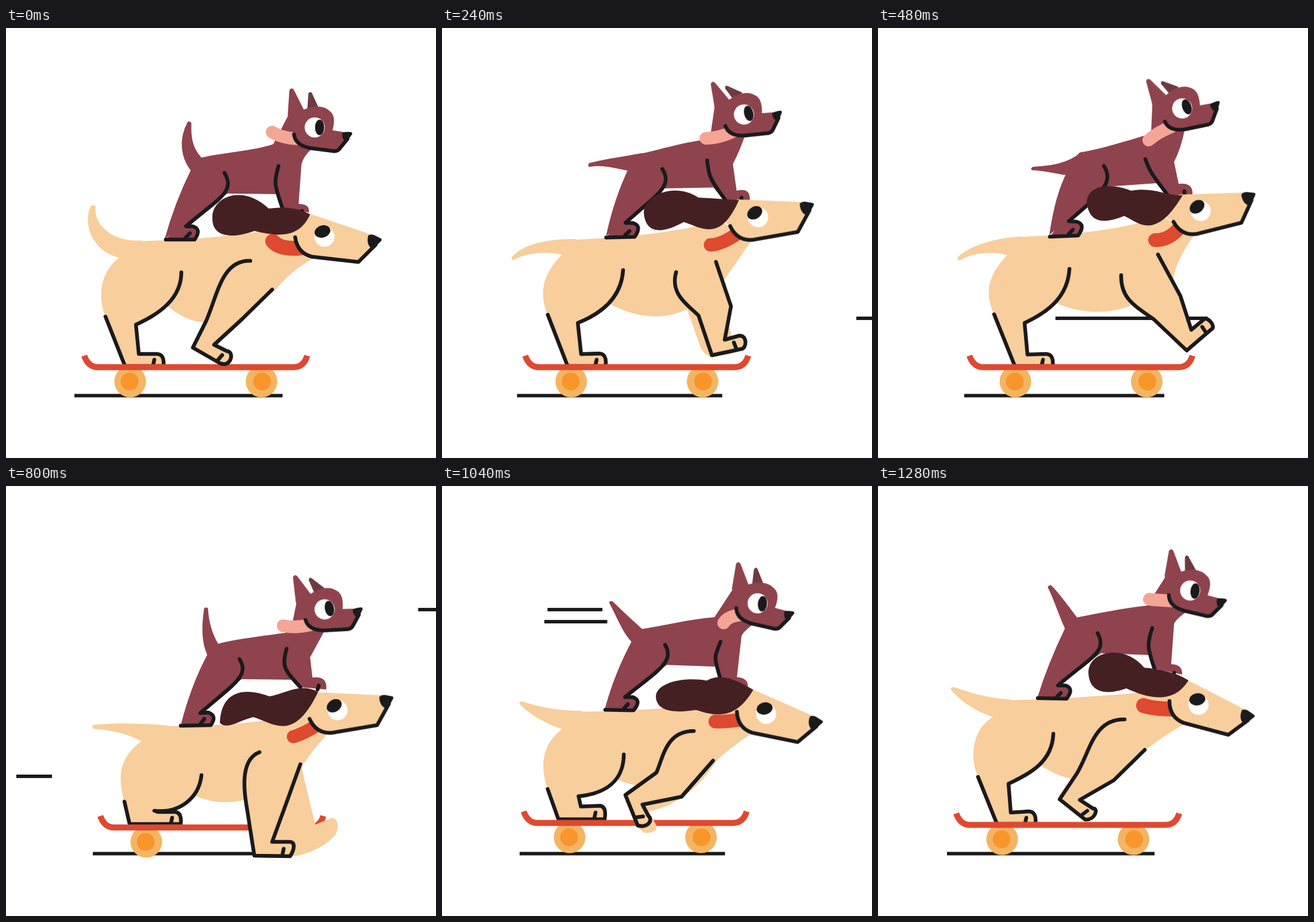
Animation of 748x748 px, one loop 1360 ms. Source, as an HTML page without scripts:

```html
<!DOCTYPE html>
<html lang="en">
<head>
<meta charset="utf-8">
<title>Skating dogs</title>
<style>
html, body { margin: 0; height: 100%; overflow: hidden; background: #fff; }
svg { display: block; width: 100vw; height: 100vh; }
path { stroke-linecap: round; stroke-linejoin: round; }
/* 17 held poses of 80ms: two per interval unless a keyframe says four */
.m { animation: 1360ms steps(2) infinite; }
.tan { fill: #f7ce9c; }
.plum { fill: #8f434d; }
.ink { fill: #1a1a1c; }
.line { stroke: #1a1a1c; stroke-width: 6.5; }
.open { fill: none; }
.tip { stroke-width: 5; }
.tan.tip { stroke: #f7ce9c; }
.plum.tip { stroke: #8f434d; }
.tongue { fill: none; stroke: #de4930; stroke-width: 22; }
.pink { stroke: #f5a596; }
.dash { fill: none; stroke: #1a1a1c; stroke-width: 6; stroke-linecap: butt; }

@keyframes ground {
  0% { d: path("M119 639.500H481") }
  11.7647% { d: path("M124 639.500H484"); animation-timing-function: steps(4) }
  35.2941% { d: path("M150 639.500H498") }
  47.0588% { d: path("M155 639.500H504") }
  58.8235% { d: path("M151 639.500H501") }
  70.5882% { d: path("M140 639.500H496"); animation-timing-function: steps(4) }
  94.1176%, to { d: path("M120 639.500H481") }
}
@keyframes dashLow {
  0%, 11.7647% { d: path("M858 505H1120"); animation-timing-function: steps(6) }
  47.0588% { d: path("M34 505H300") }
  58.8235% { d: path("M18 505H80"); animation-timing-function: steps(1) }
  64.7059%, to { d: path("M18 505H18") }
}
@keyframes dashTop {
  0%, 52.9412% { d: path("M901 215H1015"); animation-timing-function: steps(3) }
  70.5882% { d: path("M349 215H463") }
  82.3529% { d: path("M18 215H95") }
  94.1176%, to { d: path("M18 215H18") }
}
@keyframes dashMid {
  0%, 52.9412% { d: path("M965 236H1117"); animation-timing-function: steps(3) }
  70.5882% { d: path("M338 236H490") }
  82.3529% { d: path("M18 236H85") }
  94.1176%, to { d: path("M18 236H18") }
}
@keyframes board {
  0% { transform: translate(0, 0) }
  11.7647% { transform: translate(4px, 0); animation-timing-function: steps(4) }
  35.2941% { transform: translate(23px, 0) }
  47.0588% { transform: translate(29px, -2px) }
  58.8235% { transform: translate(28px, 4px) }
  70.5882% { transform: translate(8px, -5px); animation-timing-function: steps(4) }
  94.1176%, to { transform: translate(0, -.5px) }
}

@keyframes bigTail {
  0% { d: path("M149 312C136 345 155 388 200 398L235 372C185 375 150 345 153 311Z") }
  11.7647% { d: path("M118 401C140 388 180 384 210 394L225 371C180 370 140 376 118 399Z"); animation-timing-function: steps(4) }
  35.2941% { d: path("M141 402C165 388 200 385 230 394L250 365C200 368 160 382 141 400Z") }
  47.0588% { d: path("M207 335C185 360 190 415 240 436L280 416C230 418 197 375 209 337Z") }
  58.8235% { d: path("M153 420C185 422 210 428 238 442L280 419C220 414 180 415 153 418Z") }
  70.5882% { d: path("M140 386C155 402 185 418 213 428L245 400C200 400 175 396 142 386Z"); animation-timing-function: steps(4) }
  94.1176%, to { d: path("M129 353C142 370 170 390 203 400L230 374C190 372 160 362 131 352Z") }
}
@keyframes bigBody {
  0% { d: path("M205 371C270 370 380 368 490 345L540 398Q500 418 472 452Q362 556 280 482L173 502C158 465 165 420 202 396Z") }
  11.7647% { d: path("M210 370C280 368 380 362 480 338L535 372Q520 395 485 437Q400 545 285 480L178 499C162 465 170 425 204 394Z"); animation-timing-function: steps(4) }
  35.2941% { d: path("M240 364C310 360 400 358 495 328L552 358Q520 400 514 435Q420 524 308 478L202 498C185 460 190 430 228 392Z") }
  47.0588% { d: path("M270 415C340 412 420 405 503 382L557 412Q520 462 515 490Q430 570 330 532L208 541C194 500 200 460 240 435Z") }
  58.8235% { d: path("M265 418C340 416 420 418 520 395L560 430Q525 470 515 488Q420 575 330 540L206 549C192 500 200 470 238 442Z") }
  70.5882% { d: path("M235 399C300 400 380 395 510 385L540 436Q500 465 480 485Q390 550 308 517L187 534C172 490 180 455 212 430Z"); animation-timing-function: steps(4) }
  94.1176%, to { d: path("M210 373C270 372 380 368 500 355L532 415Q495 435 465 460Q372 548 282 485L174 506C158 470 165 420 203 400Z") }
}
@keyframes bigHind {
  0% { d: path("M305 425C305 470 268 497 226 516L231 567L262 567Q276 567 274 588L207 588L173 502M256 586L258 577") }
  11.7647% { d: path("M309 422C306 470 270 498 230 513L236 567L268 566Q281 567 278 588L212 588L178 499M261 586L263 577"); animation-timing-function: steps(4) }
  35.2941% { d: path("M333 419C330 468 296 494 255 513L260 568L292 567Q306 567 304 588L238 588L202 498M285 586L287 577") }
  47.0588% { d: path("M340 498C340 540 305 563 260 557L266 559L298 560Q310 561 308 582L219 582L208 541M290 580L292 571") }
  58.8235% { d: path("M340 503C336 540 305 570 258 565L264 567L295 567Q306 569 304 588L215 588L206 549M287 586L289 577") }
  70.5882% { d: path("M320 479C320 525 290 547 241 547L245 554L280 553Q290 556 286 577L201 577L187 534M268 575L270 565"); animation-timing-function: steps(4) }
  94.1176%, to { d: path("M305 431C303 480 265 500 227 518L231 568L262 566Q276 566 274 588L207 588L174 506M256 586L258 577") }
}
@keyframes farLeg {
  0% { d: path("M350 500L330 552Q350 570 372 580Q390 580 384 566L362 551Q420 500 463 455Z") }
  11.7647% { d: path("M420 490L432 565Q434 582 460 579Q510 578 508 565L490 540Q480 480 470 440Z"); animation-timing-function: steps(4) }
  35.2941% { d: path("M440 470L500 520Q537 565 555 545Q580 525 570 508L545 525Q520 460 500 430Z") }
  47.0588% { d: path("M450 520L520 580Q556 612 575 590Q608 560 580 544L557 572Q530 510 510 480Z") }
  58.8235% { d: path("M440 560L435 646Q530 655 574 606Q582 582 568 577L538 589Q526 540 513 484Z") }
  70.5882% { d: path("M400 480L325 555Q335 610 352 612Q376 612 372 598L362 572Q432 568 482 485Z"); animation-timing-function: steps(4) }
  94.1176%, to { d: path("M345 496L314 540Q340 565 360 578Q378 578 374 564L352 548Q420 505 464 459Z") }
}
@keyframes nearLeg {
  0% { d: path("M425 405C375 403 368 465 348 510L325 556L372 583C392 592 398 562 384 562L362 551L410 507L463 455M369 577L376 569") }
  11.7647% { d: path("M402 423C388 460 420 480 435 498L447 572L500 570C512 570 516 544 500 545L474 548L495 490L473 411M492 566L489 556"); animation-timing-function: steps(4) }
  35.2941% { d: path("M423 430C422 470 445 482 480 507L537 561L580 524C588 520 576 504 568 506L545 525L526 466L487 394M570 529L564 520") }
  47.0588% { d: path("M428 480C426 520 455 543 490 565L554 612L594 572C600 566 586 548 576 552L557 576L535 528L493 443M582 578L576 570") }
  58.8235% { d: path("M441 463C410 475 412 520 419 560L432 643L494 644C500 636 506 618 492 619L463 619L490 545L512 484M481 641L483 631") }
  70.5882% { d: path("M441 433C395 433 390 475 382 498L320 535L334 594C352 600 362 588 354 578L348 557L419 550L474 484M333 578L345 578"); animation-timing-function: steps(4) }
  94.1176%, to { d: path("M429 406C375 405 370 460 346 500L316 545L360 580C378 582 384 560 374 561L351 546L410 512L464 459M356 571L364 565") }
}
@keyframes bigTongue {
  0% { d: path("M464 371Q478 387 516 382"); stroke-width: 26 }
  11.7647% { d: path("M462 380Q478 380 512 360"); stroke-width: 23; animation-timing-function: steps(4) }
  35.2941% { d: path("M482 369Q505 370 524 348"); stroke-width: 24 }
  47.0588% { d: path("M487 408Q510 408 540 403"); stroke-width: 18 }
  58.8235% { d: path("M500 436Q515 432 540 417"); stroke-width: 23 }
  70.5882% { d: path("M480 419Q500 418 525 412"); stroke-width: 23; animation-timing-function: steps(4) }
  94.1176%, to { d: path("M462 382Q480 388 515 388"); stroke-width: 26 }
}
@keyframes bigHead {
  0% { transform: translate(503px, 364px) rotate(0deg) }
  11.7647% { transform: translate(497px, 347px) rotate(-15deg); animation-timing-function: steps(4) }
  35.2941% { transform: translate(514px, 337px) rotate(-20.5deg) }
  47.0588% { transform: translate(521px, 390px) rotate(-21deg) }
  58.8235% { transform: translate(528px, 405px) rotate(-16deg) }
  70.5882% { transform: translate(515px, 399px) rotate(4deg); animation-timing-function: steps(4) }
  94.1176%, to { transform: translate(507px, 374px) rotate(8.5deg) }
}
@keyframes bigEar {
  0% { d: path("M529 324C500 310 480 312 457 314C410 270 358 295 359 330C358 368 400 365 432 353C470 362 510 368 529 324") }
  11.7647% { d: path("M512 302C490 300 470 303 448 299C405 268 348 295 347 327C350 372 390 358 418 341C450 350 485 375 512 302"); animation-timing-function: steps(4) }
  35.2941% { d: path("M530 291C500 292 480 276 440 283C410 270 365 270 363 303C368 345 400 338 428 327C450 335 480 375 530 291") }
  47.0588% { d: path("M541 342C510 335 480 332 445 336C415 310 362 325 362 357C370 380 400 370 430 374C460 388 505 405 541 342") }
  58.8235% { d: path("M543 358C510 342 490 360 458 366C430 355 375 345 372 412C385 425 405 408 430 402C465 412 500 448 543 358") }
  70.5882% { d: path("M542 360C515 345 485 325 460 346C420 350 375 360 374 380C375 408 420 404 445 402C480 412 510 415 542 360"); animation-timing-function: steps(4) }
  94.1176%, to { d: path("M540 338C520 325 490 318 463 316C430 275 366 285 366 325C368 365 405 362 432 352C470 370 515 380 540 338") }
}

@keyframes pupTail {
  0% { d: path("M318 165C302 195 307 225 323 246L338 227C322 210 319 190 320 166Z") }
  11.7647% { d: path("M253 237C275 232 300 238 325 244L345 221C315 221 280 226 253 235Z"); animation-timing-function: steps(4) }
  35.2941% { d: path("M269 245C290 245 310 252 332 254L355 218C330 240 295 242 270 244Z") }
  47.0588% { d: path("M280 251C305 253 325 265 345 284L357 267C340 246 305 248 281 250Z") }
  58.8235% { d: path("M347 214C343 240 342 270 352 292L367 276C355 255 350 235 349 214Z") }
  70.5882% { d: path("M292 212C305 235 315 262 333 277L347 257C325 240 310 228 294 212Z"); animation-timing-function: steps(4) }
  94.1176%, to { d: path("M298 176C308 195 317 225 327 246L344 230C325 205 315 190 300 175Z") }
}
@keyframes pupBody {
  0% { d: path("M338 226C380 216 430 214 465 202L492 150L532 210Q518 222 514 237L509 306Q529 306 527 321L481 313L470 289L385 288L276 367Q293 305 322 246Z") }
  11.7647% { d: path("M340 220C380 212 400 202 463 196L475 130L525 190Q515 215 503 238L509 287Q535 280 531 306L488 303L468 280L383 280L281 363Q296 300 324 240Z"); animation-timing-function: steps(4) }
  35.2941% { d: path("M350 217C390 210 430 197 475 184L478 115L534 175Q527 210 515 233L523 271Q549 268 547 291L503 291L484 270L398 276L298 360Q308 290 329 250Z") }
  47.0588% { d: path("M357 265C400 252 430 246 476 233L485 170L538 225Q528 262 517 284L527 321Q555 316 551 342L503 335L485 318L400 322L304 411Q315 335 345 284Z") }
  58.8235% { d: path("M367 275C400 266 440 262 495 254L508 190L555 250Q540 278 529 298L533 333Q560 330 557 354L512 350L498 337L410 336L304 416Q322 345 352 290Z") }
  70.5882% { d: path("M345 256C390 250 430 238 476 235L509 185L542 248Q525 262 523 268L514 340Q534 342 533 356L488 342L478 321L392 318L285 395Q302 330 333 275Z"); animation-timing-function: steps(4) }
  94.1176%, to { d: path("M344 229C390 220 430 212 468 208L500 158L535 220Q518 232 515 240L510 310Q530 310 529 328L482 318L472 294L388 291L277 369Q295 310 326 246Z") }
}
/* hind leg, its toe, front leg, its toe */
@keyframes pupLegs {
  0% { d: path("M380 252C400 285 370 296 313 345L325 345Q341 350 328 368L278 368M312 365L320 357M474 240C465 270 468 275 480 311M514 325L515 318") }
  11.7647% { d: path("M380 247C400 278 368 290 315 340L328 340Q344 345 331 364L281 365M314 361L322 354M460 231C460 262 465 268 489 302M516 306L517 299"); animation-timing-function: steps(4) }
  35.2941% { d: path("M393 240C412 270 385 290 332 336L346 337Q362 342 348 361L299 363M332 358L339 351M465 228C475 255 478 255 504 291M533 291L533 284") }
  47.0588% { d: path("M398 290C416 315 395 328 337 387L352 388Q367 393 352 411L305 413M337 408L344 401M466 278C478 305 480 305 504 335M538 342L538 335") }
  58.8235% { d: path("M406 301C425 330 395 345 338 395L352 394Q368 400 356 416L304 417M338 414L345 405M488 283C480 315 483 318 512 350M542 354L544 347") }
  70.5882% { d: path("M390 283C408 312 375 330 320 374L334 374Q350 380 335 397L286 396M318 394L325 386M487 279C473 310 476 305 485 340M518 358L519 352"); animation-timing-function: steps(4) }
  94.1176%, to { d: path("M382 256C400 288 370 298 313 347L326 347Q342 352 328 370L278 369M311 367L318 360M477 247C468 275 468 280 481 318M514 331L515 325") }
}
@keyframes pupTongue {
  0% { d: path("M463 181Q480 192 512 193") }
  11.7647% { d: path("M455 191Q480 195 505 183"); animation-timing-function: steps(4) }
  35.2941% { d: path("M471 195Q485 182 510 172") }
  47.0588% { d: path("M467 206Q485 221 517 218") }
  58.8235% { d: path("M482 243Q505 248 535 240") }
  70.5882% { d: path("M496 252Q500 235 522 232"); animation-timing-function: steps(4) }
  94.1176%, to { d: path("M472 197Q490 199 515 200") }
}
@keyframes pupHead {
  0% { transform: translate(501px, 185px) rotate(0deg) }
  11.7647% { transform: translate(491px, 173px) rotate(-11.5deg); animation-timing-function: steps(4) }
  35.2941% { transform: translate(499px, 163px) rotate(-19deg) }
  47.0588% { transform: translate(504px, 211px) rotate(-19deg) }
  58.8235% { transform: translate(521px, 233px) rotate(-10.5deg) }
  70.5882% { transform: translate(514px, 220px) rotate(5.5deg); animation-timing-function: steps(4) }
  94.1176%, to { transform: translate(506px, 190px) rotate(6deg) }
}
@keyframes pupEar {
  0% { transform: rotate(0deg) }
  11.7647% { transform: rotate(-28deg); animation-timing-function: steps(4) }
  35.2941% { transform: rotate(-26deg) }
  47.0588% { transform: rotate(-10deg) }
  58.8235% { transform: rotate(-17deg) }
  70.5882% { transform: rotate(0deg); animation-timing-function: steps(4) }
  94.1176%, to { transform: rotate(-10deg) }
}
</style>
</head>
<body>
<svg viewBox="0 0 748 748">
  <path class="m dash" style="animation-name:dashLow"/>
  <path class="m dash" style="animation-name:dashTop"/>
  <path class="m dash" style="animation-name:dashMid"/>
  <path class="m dash" style="animation-name:ground"/>

  <path class="m tan tip" style="animation-name:bigTail"/>
  <path class="m tan" style="animation-name:bigBody"/>
  <path class="m tan line" style="animation-name:bigHind"/>

  <g class="m" style="animation-name:board">
    <g fill="#f4b563"><circle cx="216" cy="615" r="27.500"/><circle cx="444.500" cy="615" r="27.500"/></g>
    <g fill="#f8952b"><circle cx="215" cy="615" r="15.500"/><circle cx="445.500" cy="615" r="15.500"/></g>
    <path d="M136 570Q143 590 160 590H500Q518 590 524 570" fill="none" stroke="#de4930" stroke-width="10.500" style="stroke-linecap:butt"/>
  </g>

  <path class="m tan" style="animation-name:farLeg"/>
  <path class="m tan line" style="animation-name:nearLeg"/>

  <path class="m plum tip" style="animation-name:pupTail"/>
  <path class="m plum" style="animation-name:pupBody"/>
  <path class="m plum line" style="animation-name:pupLegs"/>
  <path class="m tongue pink" style="animation-name:pupTongue"/>
  <g class="m" style="animation-name:pupHead">
    <path class="m" d="M23 -42L25 -71Q28 -76 31 -72L43 -46Z" fill="#6d3a42" style="animation-name:pupEar;transform-origin:35px -46px"/>
    <path class="plum" d="M0 0L-11 -33L-8 -77Q-4 -83 0 -77L17 -43Q48 -56 65 -38Q73 -28 67 -7L86 -4L95 6L76 28L29 23Q2 18 0 0Z"/>
    <circle cx="36" cy="-12" r="17.500" fill="#fff"/>
    <ellipse class="ink" cx="44.500" cy="-12" rx="8" ry="13.500"/>
    <path class="line open" d="M0 0Q2 19 29 24L68 29Q76 30 80 24L93 8"/>
    <path class="ink" d="M84 -3Q90 -5 99 -4Q102 -3 101 0L91 14Q82 8 84 -3Z"/>
  </g>

  <path class="m tongue" style="animation-name:bigTongue"/>
  <g class="m" style="animation-name:bigHead">
    <path class="tan" d="M0 0L-16 -20L25 -41L137 -3L146 8L110 42L30 33Q4 27 0 0Z"/>
    <circle cx="51" cy="-1" r="17.500" fill="#fff"/>
    <ellipse class="ink" cx="47.500" cy="-10" rx="14" ry="10.500" transform="rotate(-18 47.500 -10)"/>
    <path class="line open" d="M0 0Q4 28 30 34L110 43L140 13"/>
    <path class="ink" d="M127 -3Q131 -6 137 -4L149 2Q152 4 149 7L135 21Q123 14 127 -3Z"/>
  </g>
  <path class="m" fill="#452023" style="animation-name:bigEar"/>
</svg>
</body>
</html>
```
